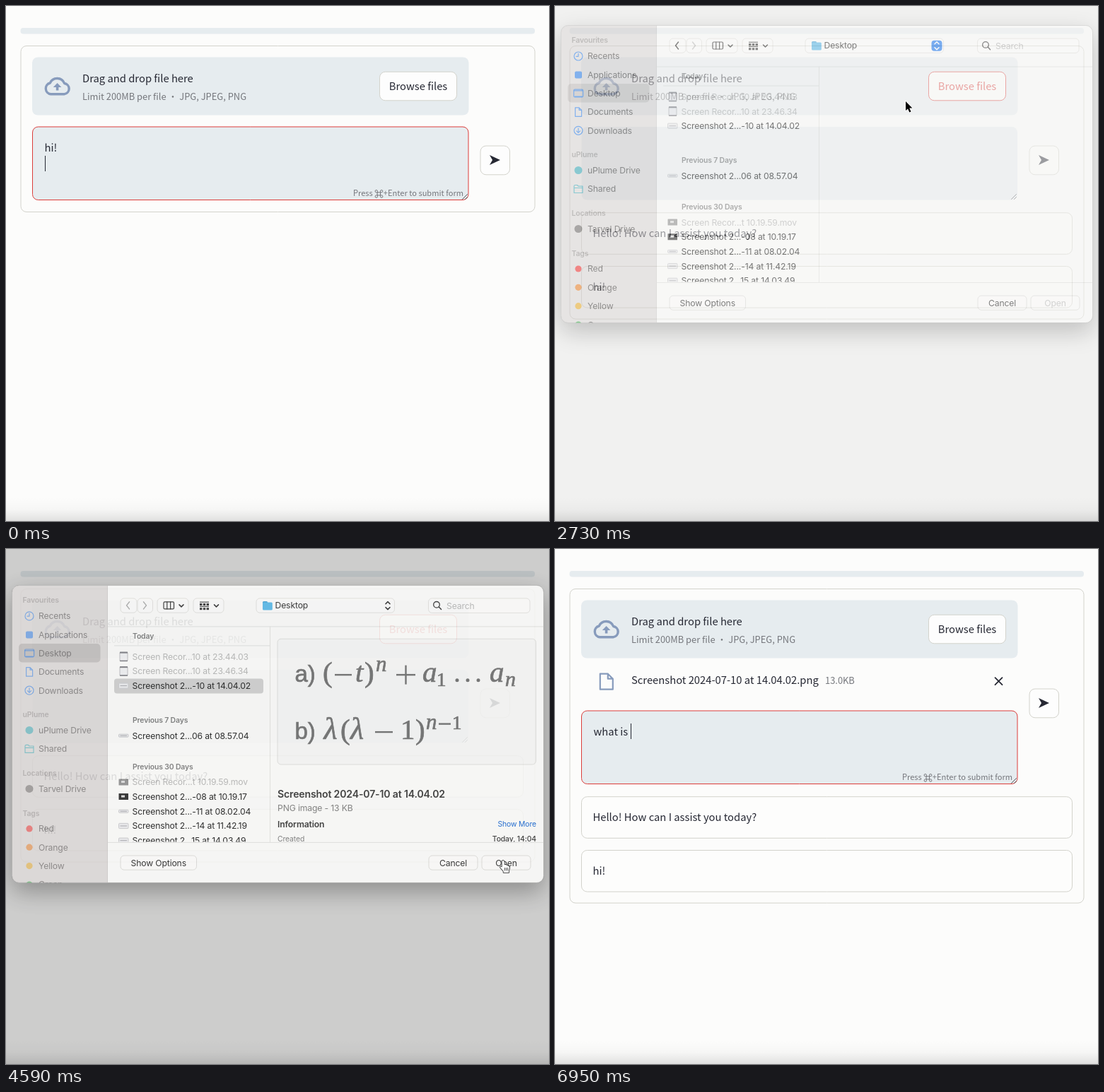
An HTML page with a canvas that plays this animation: 768x729 px, repeating every 8 s.

```html
<!DOCTYPE html>
<html lang="en">
<head>
<meta charset="utf-8">
<title>Chat upload</title>
<style>
html, body { margin: 0; width: 100%; height: 100%; overflow: hidden; background: #fcfcfb; }
canvas { display: block; }
</style>
</head>
<body>
<canvas id="stage" width="768" height="729"></canvas>
<script>
const W = 768, H = 729, LOOP = 8000;
const PAGE_FONT = '"Noto Sans CJK SC", "Noto Sans CJK JP", "Noto Sans CJK", "Noto Sans", sans-serif';
const UI_FONT = 'Inter, Roboto, sans-serif';
const MATH_FONT = '"Liberation Serif", "Noto Serif", serif';
const INK = '#262833', MUTED = '#75777c', RED = '#dc3d3a', PANEL = '#e6ecef', EDGE = '#d3d3cc', BLUE = '#1577e0';

const main = document.getElementById('stage').getContext('2d');
const sheetCanvas = document.createElement('canvas');
sheetCanvas.width = W;
sheetCanvas.height = H;
const sheet = sheetCanvas.getContext('2d');
let c = main;

// Each step changes part of the state and holds until the next one.
const steps = [
  [0, { text: 'hi!\n', focus: true, hint: true, msgs: [], fill: 0, mouse: null, file: false, hot: false,
        alpha: 0, dy: 0, dim: 0, side: 1, picked: false, idle: false, pressed: false }],
  [250, { text: '', hint: false, msgs: ['hi!'] }],
  [370, { fill: 3 }],
  [620, { fill: 6 }],
  [870, { fill: 9 }],
  [1120, { fill: 12, mouse: ['beam', 480, 204] }],
  [1370, { fill: 20, msgs: ['Hello! How can I assist you today?', 'hi!'], mouse: ['beam', 492, 188] }],
  [1490, { fill: 300, mouse: ['arrow', 510, 158] }],
  [1740, { fill: 620, mouse: ['hand', 548, 122], hot: true }],
  [1860, { fill: 722 }],
  [2110, { fill: 727 }],
  [2230, { fill: 0 }],
  [2480, { focus: false }],
  [2730, { alpha: 0.55, dy: -27.5, dim: 0.045, side: 0.85, mouse: ['arrow', 496, 135] }],
  [2980, { alpha: 0.96, dy: -3, dim: 0.2, side: 1, mouse: ['arrow', 330, 176] }],
  [3230, { alpha: 1, dy: 0, dim: 0.23, mouse: ['arrow', 245, 193] }],
  [3600, { picked: true }],
  [3720, { mouse: ['arrow', 262, 204] }],
  [3970, { mouse: ['arrow', 560, 380] }],
  [4090, { mouse: ['arrow', 703, 437] }],
  [4340, { pressed: true, mouse: ['arrow', 703, 441] }],
  [4590, { pressed: false, idle: true, alpha: 0.85, dy: -3.6, dim: 0.19, side: 0.5, mouse: ['hand', 703, 441] }],
  [4840, { alpha: 0.3, dy: -30, dim: 0.04, mouse: ['arrow', 610, 362] }],
  [5090, { alpha: 0, dim: 0, file: true, mouse: ['beam', 423, 244] }],
  [5210, { mouse: ['beam', 417, 251] }],
  [5460, { focus: true, mouse: ['beam', 414, 254] }],
  [6080, { text: 'what', hint: true, hot: false, mouse: null }],
  [6950, { text: 'what is ' }]
];

function stateAt(t) {
  return Object.assign({}, ...steps.filter(s => s[0] <= t).map(s => s[1]));
}

// y is the middle of the capitals
function label(str, x, y, size, color, o = {}) {
  c.font = `${o.style || ''} ${o.weight || 400} ${size}px ${o.font || UI_FONT}`;
  c.letterSpacing = (o.font ? 0 : -0.012 * size) + 'px';
  c.textAlign = o.align || 'left';
  c.fillStyle = color;
  c.fillText(str, x, y + size * 0.365);
}
const pageText = (str, x, y, color = INK, size = 14.77, align = 'left') =>
  label(str, x, y, size, color, { font: PAGE_FONT, align });

function box(x, y, x2, y2, r, fill, stroke, lw = 1) {
  c.beginPath();
  c.roundRect(x, y, x2 - x, y2 - y, r);
  if (fill) { c.fillStyle = fill; c.fill(); }
  if (stroke) { c.strokeStyle = stroke; c.lineWidth = lw; c.stroke(); }
}

function dot(x, y, r, fill, stroke, lw = 1) {
  c.beginPath();
  c.arc(x, y, r, 0, Math.PI * 2);
  if (fill) { c.fillStyle = fill; c.fill(); }
  if (stroke) { c.strokeStyle = stroke; c.lineWidth = lw; c.stroke(); }
}

function path(d, x, y, fill, stroke, lw = 1) {
  const p = new Path2D(d);
  c.save();
  c.translate(x, y);
  c.lineJoin = c.lineCap = 'round';
  if (stroke) { c.strokeStyle = stroke; c.lineWidth = lw; c.stroke(p); }
  if (fill) { c.fillStyle = fill; c.fill(p); }
  c.restore();
}

function drawInput(s, top) {
  const bottom = top + 103.5;
  box(37.5, top, 654, bottom, 8, PANEL, s.focus ? RED : null);
  const lines = s.text.split('\n');
  lines.forEach((line, i) => pageText(line, 54.5, top + 29.2 + i * 23));
  if (s.focus) {
    const last = lines.length - 1;
    c.font = `400 14.77px ${PAGE_FONT}`;
    const x = Math.round(54.5 + c.measureText(lines[last]).width);
    c.fillStyle = INK;
    c.fillRect(x, top + 18 + last * 23, 1, 22);
  }
  if (s.hint) {
    const y = top + 94.4;
    pageText('Press', 491, y, MUTED, 11.1);
    path('M4 4H8V8H4Z M4 4H2.3A1.7 1.7 0 1 1 4 2.3Z M8 4V2.3A1.7 1.7 0 1 1 9.7 4Z M8 8H9.7A1.7 1.7 0 1 1 8 9.7Z M4 8V9.7A1.7 1.7 0 1 1 2.3 8Z',
      521.5, y - 5.5, null, MUTED, 1);
    pageText('+Enter to submit form', 647, y, MUTED, 11.1, 'right');
  }
  path('M0 7L7 0 M4 7L7 4', 645.5, bottom - 8, null, '#55575c', 1);
}

function drawPage(s) {
  const shift = s.file ? 58 : 0;
  c.fillStyle = '#fcfcfb';
  c.fillRect(0, 0, W, H);
  const fade = c.createLinearGradient(0, 696, 0, H);
  fade.addColorStop(0, 'rgba(0,0,0,0)');
  fade.addColorStop(0.5, 'rgba(0,0,0,.025)');
  fade.addColorStop(1, 'rgba(0,0,0,.11)');
  c.fillStyle = fade;
  c.fillRect(0, 696, W, H - 696);

  box(20.5, 31, 748, 39.5, 4, PANEL);
  if (s.fill) box(20.5, 31, 20.5 + s.fill, 39.5, Math.min(4, s.fill / 2), BLUE);
  box(21, 56.5, 748, 291.5 + shift + s.msgs.length * 75.8, 8, null, EDGE);

  box(37, 72.5, 654.5, 154.5, 8, PANEL);
  path('M9.5 24.5A8 8 0 0 1 8.5 8.8A11 11 0 0 1 28.8 9.3A7.7 7.7 0 0 1 29 24.5Z', 53.8, 100.2, null, '#879bbc', 3.4);
  path('M0 6L5.8 0L11.6 6H7.6V10.5H4V6Z', 66.8, 109, '#879bbc');
  pageText('Drag and drop file here', 108, 102.4);
  pageText('Limit 200MB per file • JPG, JPEG, PNG', 108, 128.6, MUTED, 12.9);
  const tint = s.hot ? RED : null;
  box(528.5, 93.2, 637.5, 133.8, 8, '#fdfdfd', tint || EDGE);
  pageText('Browse files', 583, 113.6, tint || INK, 14.77, 'center');

  if (s.file) {
    path('M0 1.5H11L18 8.5V23.5H0Z M11 1.5V8.5H18', 63.8, 175.2, null, '#879bbc', 2.2);
    pageText('Screenshot 2024-07-10 at 14.04.02.png', 108, 186);
    pageText('13.0KB', 382, 186.5, MUTED, 12.9);
    path('M0 0L10 10M10 0L0 10', 622.5, 182.2, null, INK, 1.8);
  }
  drawInput(s, 171 + shift);

  box(671, 198, 712.5, 238.8, 8, '#fdfdfd', EDGE);
  path('M0 0L15 7L0 14L4 7Z', 684, 211, INK);

  s.msgs.forEach((m, i) => {
    const y = 292.7 + shift + i * 75.8;
    box(37.5, y, 731.5, y + 58.6, 8, '#fdfdfc', EDGE);
    pageText(m, 53.5, y + 29.4);
  });
}

function drawSidebar(s) {
  const blue = '#0a6ff0', teal = '#18a3b4', gray = '#5a5856', text = '#2a2827';
  box(8.5, 55, 143.5, 476, [10, 0, 0, 10], '#dedad9');
  box(18, 137.6, 133.5, 164, 5, '#c2bebd');
  c.save();
  c.globalAlpha = s.side;
  [['Favourites', 76], ['uPlume', 238], ['Locations', 321], ['Tags', 377.5]].forEach(([n, y]) =>
    label(n, 23.5, y, 10.4, '#8a8685', { weight: 600 }));
  [['Recents', 98.5], ['Applications', 125], ['Desktop', 151], ['Documents', 177.5], ['Downloads', 203.8],
   ['uPlume Drive', 260], ['Shared', 286.5], ['Tarvel Drive', 343],
   ['Red', 399.5], ['Orange', 425.8], ['Yellow', 452.2], ['Green', 478.6]].forEach(([n, y]) =>
    label(n, 46, y, 12.2, text));

  dot(33, 98.5, 6, null, blue, 1.2);
  path('M0 0V4H-3', 33, 94.8, null, blue, 1.2);
  box(28, 120, 38, 130, 2, blue);
  box(26.6, 145.6, 39.6, 156.4, 1.5, null, blue, 1.2);
  path('M0 0H12 M1 8.2H11', 27.1, 147.4, null, blue, 1.2);
  path('M0 0H5.5L9 3.5V12.5H0Z M5.5 0V3.5H9', 28.6, 171.3, null, blue, 1.2);
  dot(33, 203.8, 6, null, blue, 1.2);
  path('M0 0V6.4M-2.6 3.8L0 6.4L2.6 3.8', 33, 200.5, null, blue, 1.2);
  dot(33, 260, 5.5, teal);
  path('M0 1.5Q0 0 1.5 0H4.5L6 1.6H12V11H0Z M0 4H12', 27, 281, null, teal, 1.2);
  dot(33, 343, 5.5, gray);
  [['#f5100f', 399.5], ['#f07106', 425.8], ['#eea60a', 452.2], ['#1da832', 478.6]].forEach(([k, y]) => dot(33, y, 4.6, k));
  c.restore();
}

function drawToolbar(s) {
  const line = '#e3e2df', dark = '#2d2d2d';
  const cy = 83.5;
  [[162, 185], [186, 207.5], [214, 258], [265, 308]].forEach(([a, b]) => box(a, 73.5, b, 93.8, 5, '#fffefd', line));
  path('M4 0L0 5L4 10', 170.5, cy - 5, null, s.idle ? '#a9a9a9' : dark, 1.5);
  path('M0 0L4 5L0 10', 194.5, cy - 5, null, s.idle ? '#a9a9a9' : '#c0c0c0', 1.5);
  box(223, 78.5, 237.5, 88.5, 1.5, null, dark, 1.2);
  path('M0 0V10M4.8 0V10', 227.8, 78.5, null, dark, 1.2);
  c.fillStyle = dark;
  for (let row = 0; row < 2; row++) {
    c.fillRect(274, 78.2 + row * 6.2, 13, 1.1);
    for (let i = 0; i < 3; i++) c.fillRect(274 + i * 4.8, 80.6 + row * 6.2, 3.4, 3);
  }
  [245, 294.5].forEach(x => path('M0 0L3 3L6 0', x, 82.5, null, dark, 1.5));

  box(354, 73.5, 549.5, 93.8, 5, '#fffefd', line);
  box(363, 77.5, 370, 82, 1.5, '#3f9fd6');
  box(363, 79, 376.8, 90, 1.5, '#56b8ea');
  label('Desktop', 380.5, cy, 12.2, '#252525');
  if (!s.idle) box(532.5, 76.2, 547.5, 91.2, 4, '#1976f0');
  path('M0 3L3 0L6 3M0 8L3 11L6 8', 537, 78.2, null, s.idle ? dark : '#fff', 1.5);

  box(597.5, 73.5, 741, 94, 5, '#fffefd', line);
  dot(609, 82.4, 4.3, null, dark, 1.3);
  path('M0 0L3.4 3.6', 612.2, 85.6, null, dark, 1.4);
  label('Search', 623, 84, 12.2, '#b5b5b5');
}

function drawFiles(s) {
  label('Today', 179, 127, 10.4, '#757575', { weight: 600 });
  label('Previous 7 Days', 179, 245.5, 10.4, '#757575', { weight: 600 });
  label('Previous 30 Days', 179, 311.5, 10.4, '#757575', { weight: 600 });
  if (s.picked) box(153, 187, 364, 208, 4, '#cfcfce');
  const rows = [
    ['Screen Recor…10 at 23.44.03', 156, 'tall'], ['Screen Recor…10 at 23.46.34', 176.6, 'tall'],
    ['Screenshot 2…-10 at 14.04.02', 197.2, 'wide'], ['Screenshot 2…06 at 08.57.04', 267.8, 'thin'],
    ['Screen Recor…t 10.19.59.mov', 333.6, 'film'], ['Screenshot 2…-08 at 10.19.17', 354.2, 'dark'],
    ['Screenshot 2…-11 at 08.02.04', 374.9, 'thin'], ['Screenshot 2…-14 at 11.42.19', 395.6, 'wide'],
    ['Screenshot 2…15 at 14.03.49', 416.3, 'wide']
  ];
  for (const [name, y, kind] of rows) {
    const off = kind === 'tall' || kind === 'film';
    label(name.replace('…', '...'), 178.5, y, 12.2, off ? '#b4b4b3' : '#151515');
    if (kind === 'tall') {
      box(161, y - 6.3, 172, y + 6.3, 1, '#f2f2f4', '#b9b9bd');
      c.fillStyle = '#77777d';
      c.fillRect(161, y - 6.8, 11, 2);
      c.fillRect(161, y + 5.2, 11, 1.5);
    } else if (off || kind === 'dark') {
      box(159.5, y - 4.5, 173, y + 4.5, 0.5, off ? '#8d8d8d' : '#222');
      c.fillStyle = '#ddd';
      c.fillRect(163, y - 2, 5, 3);
    } else {
      const h = kind === 'thin' ? 2 : 3.6;
      box(159.5, y - h, 173, y + h, 1, '#ececee', '#c9c9cc');
      c.fillStyle = '#a4a4aa';
      c.fillRect(161.5, y - 0.5, 9.5, 1);
    }
  }
}

function drawFormula() {
  const ink = '#686868';
  const put = (str, x, base, size, style = 'italic', font = MATH_FONT) => {
    label(str, x, base - size * 0.365, size, ink, { style, font });
    c.strokeStyle = ink;
    c.lineWidth = 0.7;
    c.strokeText(str, x, base);
  };
  const bar = (x, y, w) => { c.fillStyle = ink; c.fillRect(x, y, w, 2.4); };
  const sans = '"Liberation Sans", sans-serif';
  put('a)', 408.5, 191.5, 33, 'normal', sans);
  put('(', 448, 191.5, 41, 'normal');
  bar(465, 180.5, 24);
  put('t', 494, 191.5, 41);
  put(')', 507, 191.5, 41, 'normal');
  put('n', 523, 177, 31);
  bar(552, 180.5, 27);
  c.fillRect(564.3, 168.2, 2.4, 27);
  put('a', 589, 191.5, 41);
  put('1', 609, 197.5, 27, 'normal');
  [638, 653, 668].forEach(x => dot(x, 189.3, 2.5, ink));
  put('a', 684, 191.5, 41);
  put('n', 706, 197.5, 30);

  put('b)', 408.5, 273, 33, 'normal', sans);
  put('λ', 449.5, 273, 44);
  put('(', 473, 273, 41, 'normal');
  put('λ', 487, 273, 44);
  bar(522, 261.5, 25);
  put('1', 558, 273, 41, 'normal');
  put(')', 579, 273, 41, 'normal');
  put('n', 594, 259, 31);
  bar(612, 250, 17);
  put('1', 631, 259, 27, 'normal');
}

function drawPreview() {
  box(384, 130.8, 749.5, 308.6, 5, '#f8f8f7', '#dededc');
  drawFormula();
  label('Screenshot 2024-07-10 at 14.04.02', 384, 350.6, 14.1, '#2c2c2c', { weight: 600 });
  label('PNG image - 13 KB', 384, 370, 12.2, '#777');
  label('Information', 384, 393, 12.2, '#2c2c2c', { weight: 600 });
  label('Show More', 750, 393.2, 10.4, '#0b5fd0', { align: 'right' });
  label('Created', 384, 414, 10.4, '#777');
  label('Today, 14:04', 750, 414, 10.4, '#2c2c2c', { align: 'right', weight: 500 });
}

function drawSheet(s) {
  c = sheet;
  c.clearRect(0, 0, W, H);
  c.save();
  c.translate(0, s.dy);
  c.save();
  c.shadowColor = 'rgba(0,0,0,.38)';
  c.shadowBlur = 34;
  c.shadowOffsetY = 12;
  box(8.5, 55, 760.5, 476, 10, '#fdfdfb');
  c.restore();

  c.save();
  c.beginPath();
  c.roundRect(8.5, 55, 752, 421, 10);
  c.clip();
  drawSidebar(s);
  drawToolbar(s);
  c.fillStyle = '#e2e2df';
  c.fillRect(144, 113, 617, 1);
  c.fillRect(144, 418.5, 617, 1);
  c.fillRect(373, 113, 1, 305.5);
  c.fillRect(153, 140, 220, 1);
  c.fillStyle = '#d0cccb';
  c.fillRect(143, 55, 1, 421);

  c.save();
  c.beginPath();
  c.rect(144, 114, 617, 304);
  c.clip();
  drawFiles(s);
  if (s.picked) drawPreview();
  c.restore();

  [['Show Options', 162, 269.5], ['Cancel', 598, 667], ['Open', 673, 742]].forEach(([n, a, b]) => {
    const open = n === 'Open';
    box(a, 437.6, b, 457.8, 5, open && s.pressed ? '#e6e6e5' : '#fffefd', '#dddcd9');
    label(n, (a + b) / 2, 447.7, 12.2, open && !s.picked ? '#b9b9b8' : '#222', { align: 'center' });
  });
  c.restore();
  box(8.5, 55, 760.5, 476, 10, null, 'rgba(0,0,0,.22)', 0.8);
  c.restore();
  c = main;
  c.globalAlpha = s.alpha;
  c.drawImage(sheetCanvas, 0, 0);
  c.globalAlpha = 1;
}

function drawMouse([kind, x, y]) {
  if (kind === 'beam') {
    const d = 'M-3 -7.5Q0 -7.5 0 -5.5Q0 -7.5 3 -7.5M0 -5.5V5.5M-3 7.5Q0 7.5 0 5.5Q0 7.5 3 7.5M-1.5 2H1.5';
    path(d, x, y, null, '#fff', 2.6);
    path(d, x, y, null, '#1a1a1a', 1.2);
  } else if (kind === 'arrow') {
    path('M0 0V13L3 10.4L5.3 15.4L7.5 14.4L5.3 9.6H9.4Z', x, y, '#000', '#fff', 1.8);
  } else {
    path('M-1.5 0.8Q0 -0.8 1.5 0.8L2 6.2Q4 5.2 5 6.8Q7 6.2 7.6 8Q9.4 7.8 9.2 10L8.2 14.6V17H0.6V15L-4 9.8Q-4 7.6 -1.4 9.2Z',
      x, y, '#fff', '#222', 1.6);
    path('M2.4 10.5V14M4.6 10.5V14M6.7 10.5V14', x, y, null, '#222', 0.8);
  }
}

function draw(t) {
  const s = stateAt(t);
  c = main;
  drawPage(s);
  if (s.dim) {
    c.fillStyle = `rgba(0,0,0,${s.dim})`;
    c.fillRect(0, 0, W, H);
  }
  if (s.alpha) drawSheet(s);
  if (s.mouse) drawMouse(s.mouse);
}

const start = performance.now();
function frame() {
  draw((performance.now() - start) % LOOP);
  requestAnimationFrame(frame);
}
frame();
</script>
</body>
</html>
```
